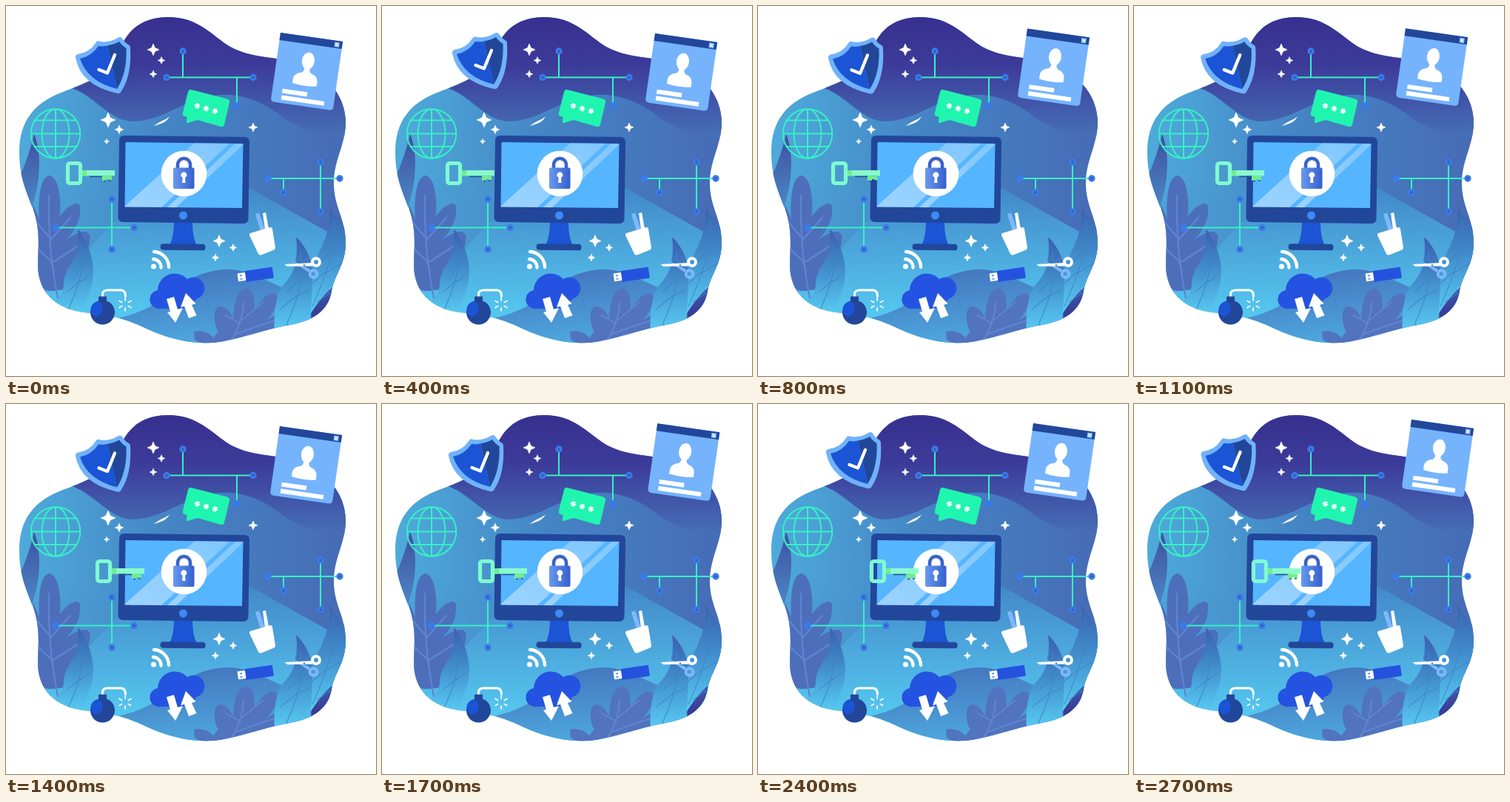
An HTML page that plays this animation: 500x500 px, repeating every 2.8 s.

```html
<!DOCTYPE html>
<html lang="en">
<head>
<meta charset="utf-8">
<title>Data security</title>
<style>
html, body { margin: 0; width: 100%; height: 100%; overflow: hidden; background: #fff; }
svg { display: block; width: 100vw; height: 100vh; }
.vein { fill: none; stroke: #6084d2; stroke-width: 2.2; stroke-linecap: round; }
.rib { fill: none; stroke: #3f83c4; stroke-width: 1.2; stroke-linecap: round; opacity: .8; }
.wire { fill: none; stroke: #37f0c5; stroke-width: 2; }
.line { fill: none; stroke: #fff; stroke-linecap: round; stroke-linejoin: round; }
</style>
</head>
<body>
<svg viewBox="0 0 500 500">
  <defs>
    <clipPath id="blob"><path d="M219 15C257 15 275 36 298 52C326 70 352 67 385 75C429 85 459 119 459 157C459 188 443 208 443 239C443 272 459 287 459 319C459 350 444 362 440 385C436 413 412 426 383 431C345 438 320 449 288 454C251 459 216 448 190 436C155 419 132 417 105 414C67 409 43 387 43 349C44 320 46 299 36 273C26 247 18 230 18 197C18 156 38 132 72 118C100 107 127 99 143 77C158 55 163 16 219 15Z"/></clipPath>
    <clipPath id="screen"><path d="M161.500 184L320.500 186L319 273L160.500 271.500Z"/></clipPath>
    <linearGradient id="mid"><stop offset="0" stop-color="#4faedd"/><stop offset=".45" stop-color="#4484c4"/><stop offset="1" stop-color="#4767b3"/></linearGradient>
    <linearGradient id="sky" x2="0" y2="1"><stop offset=".1" stop-color="#38308f"/><stop offset=".45" stop-color="#3c3b99"/><stop offset="1" stop-color="#4670b7"/></linearGradient>
    <linearGradient id="ground" x2="0" y2="1"><stop offset="0" stop-color="#4388c9"/><stop offset=".75" stop-color="#57cef3"/><stop offset="1" stop-color="#5fdbfb"/></linearGradient>
    <linearGradient id="left" x2="0" y2="1"><stop offset="0" stop-color="#448bc9" stop-opacity="0"/><stop offset="1" stop-color="#4f9dd8"/></linearGradient>
    <linearGradient id="hill" x2=".3" y2="1"><stop offset="0" stop-color="#446fbb"/><stop offset="1" stop-color="#4eaee1"/></linearGradient>
    <linearGradient id="leaf" x2="0" y2="1"><stop offset="0" stop-color="#3a5fae"/><stop offset=".4" stop-color="#3f86c8"/><stop offset="1" stop-color="#58cdf4"/></linearGradient>
    <linearGradient id="dusk" x2="0" y2="1"><stop offset="0" stop-color="#414f9f"/><stop offset="1" stop-color="#4b8fcd"/></linearGradient>
    <linearGradient id="corner" x2="0" y2="1"><stop offset="0" stop-color="#4488c8"/><stop offset="1" stop-color="#38298a"/></linearGradient>
    <linearGradient id="lock"><stop offset="0" stop-color="#6799ef"/><stop offset="1" stop-color="#365fce"/></linearGradient>
    <linearGradient id="shine" x1="1" y1="0" x2="0" y2="1"><stop offset="0" stop-color="#fff" stop-opacity=".24"/><stop offset="1" stop-color="#fff" stop-opacity=".42"/></linearGradient>
  </defs>

  <g clip-path="url(#blob)">
    <path fill="url(#mid)" d="M0 0H500V500H0Z"/>
    <path fill="url(#sky)" d="M80 0H480V177C430 178 397 168 370 147C345 128 313 116 281 121C240 127 213 154 174 156C138 157 121 118 80 108Z"/>
    <path fill="url(#ground)" d="M0 430L103 338L145 292L327 245L470 325V500H0Z"/>
    <path fill="url(#left)" d="M0 240H150V288L103 338L30 410Z"/>
    <path fill="url(#hill)" d="M140 424C180 417 200 405 226 385C252 363 286 351 318 358C348 364 366 383 400 386L450 400V470H140Z"/>
    <!-- left foliage -->
    <path fill="url(#dusk)" d="M38 173C47 193 46 225 42 245C38 263 34 276 30 288L14 240C23 222 31 202 38 173Z"/>
    <path fill="#4d6fbb" d="M59 229C70 232 75 254 73 284C83 269 98 262 100 271C102 287 94 304 81 316C93 308 108 300 113 309C116 328 101 346 84 354C102 350 109 357 103 368C93 381 73 386 58 385L40 380V296L36 268C42 280 44 285 45 290C43 257 47 230 59 229Z"/>
    <path class="vein" d="M58 256C57 310 61 350 71 400M59 317L87 286M61 348L96 325M58 312L43 294M61 345L42 327"/>
    <path fill="url(#leaf)" d="M97 301C108 315 118 337 118 359C118 382 108 397 101 418L62 408C70 392 77 393 78 375C78 360 88 350 94 337C98 326 98 315 97 301Z"/>
    <path class="rib" d="M102 323C108 357 95 386 83 413M104 352L92 367M101 371L84 385M105 352L114 342M101 372L114 363"/>
    <!-- lower leaves -->
    <g fill="#5273bd">
      <path d="M322 382C332 379 337 393 336 411C344 397 357 383 365 390C370 401 362 414 352 425C365 416 386 409 390 417C393 429 377 438 355 445L300 466H277C278 452 282 444 287 440C280 430 279 407 289 406C298 406 303 414 307 422C308 403 311 387 322 382Z"/>
      <path d="M254 440C267 437 279 443 285 455L277 463L255 451Z"/>
    </g>
    <path class="vein" d="M321 401C320 425 309 444 301 459M316 429L297 418M319 424L347 401M311 443L365 424"/>
    <!-- right foliage -->
    <path fill="url(#corner)" d="M430 315H470V440H403Z"/>
    <path fill="url(#leaf)" d="M438 268C440 288 456 290 462 307V365C445 377 433 383 411 417C407 397 407 377 412 359C416 342 430 325 434 304C437 292 438 282 438 268Z"/>
    <path class="rib" d="M443 288C447 327 430 370 414 406M439 332L420 352M440 333L458 319M432 359L415 374M433 360L455 347"/>
    <path fill="url(#leaf)" d="M392 312C406 326 414 342 414 363C414 393 411 410 413 432L363 440C362 423 363 405 367 393C371 374 386 372 390 350C393 336 394 328 392 312Z"/>
    <path class="rib" d="M398 334C404 370 391 405 378 433M400 367L380 386M401 369L412 358M394 391L371 409M394 392L411 383"/>
    <path class="rib" stroke="#57cdf3" d="M420 400L438 388M432 387L443 389"/>
  </g>

  <g class="wire">
    <circle cx="67" cy="172.500" r="33.300"/><ellipse cx="67" cy="172.500" rx="18.500" ry="33.300"/>
    <path d="M67 139V206M33.500 172.500H100.500M39 154.500H95M39 190H95"/>
    <path d="M239 61V96.500M217 96.500H334M312 96.500V135M354 233H451M425 211V278M375 233V252M67 299.500H173M143 261V329"/>
  </g>
  <g id="nodes"></g>
  <g id="stars" fill="#fff"></g>
  <path fill="#fff" d="M199 162C210 160 218 156 221 149C218 153 207 156 203 160Z"/>

  <!-- chat bubble -->
  <path fill="#20f5b0" d="M250 113L299 125.500Q303 127 302 130.500L295 160Q294 164 290 163L259 154L244 158.500L244.500 150L241 149Q238 147.500 239 144L246 116Q247 112.500 250 113Z"/>
  <path id="dots" class="line" stroke-width="2.100"/>

  <!-- monitor -->
  <path fill="#1b54d5" d="M227 291H252Q252 314 258 323H221Q227 312 227 291Z"/>
  <rect x="208.500" y="321.500" width="61" height="8.500" rx="4" fill="#22479a" transform="rotate(.8 239 326)"/>
  <path fill="#22479a" d="M160 175L322 177Q329 177 329 184L327.500 287Q327.500 294 320 294L158 292Q151.500 292 151.500 285L153 182Q153 175 160 175Z"/>
  <path fill="#56b5ff" d="M161.500 184L320.500 186L319 273L160.500 271.500Z"/>
  <g clip-path="url(#screen)" fill="url(#shine)">
    <path d="M256 184H304L208 274H160V271Z"/><path d="M312 184H324L228 274H216Z"/>
  </g>
  <circle cx="239.500" cy="283" r="5.500" fill="#3d8af8"/>
  <circle cx="240.500" cy="226.500" r="30.800" fill="#fff"/>
  <path d="M232 220V214.500A8.500 8.500 0 0 1 249 214.500V220" fill="none" stroke="#3764c6" stroke-width="4.500"/>
  <rect x="226" y="218.500" width="28.500" height="28.500" rx="2" fill="url(#lock)"/>
  <path fill="#fff" d="M238.700 232A4 4 0 1 1 242 232L242.500 239H238Z"/>

  <!-- wifi -->
  <circle cx="199.500" cy="352" r="3.600" fill="#fff"/>
  <path class="line" stroke-width="4.300" d="M199 342A11 11 0 0 1 209.500 353.500M200 332A21 21 0 0 1 220 353"/>

  <!-- cup -->
  <path fill="#80b7fb" d="M337 281L342 279.500L350 303L344 305Z"/>
  <path fill="#fff" d="M347 280L351 279L355 301L350 302Z"/>
  <path fill="#fff" d="M330 307L357 299Q360 299 360 302L364 326Q364 329 361 330L345 336.500Q342 337 341 335L329.500 311Q328 308 330 307Z"/>

  <!-- flash drive -->
  <g transform="rotate(-8 337 363)">
    <rect x="323" y="356" width="38" height="15" rx="1" fill="#2452df"/>
    <rect x="313" y="358" width="10.500" height="11" fill="#fff"/>
    <path fill="#619cf0" d="M316 360.500h3v2h-3zM316 365h3v2h-3z"/>
  </g>

  <!-- scissors -->
  <g fill="none" stroke-width="4">
    <path fill="#80b7fb" d="M385 343L411 356L409 360Z"/><circle cx="415.500" cy="362" r="4.800" stroke="#80b7fb"/>
    <path fill="#fff" d="M376.500 349L414 347V351.500L380 352Z"/><circle cx="419" cy="346" r="5" stroke="#fff"/>
  </g>
  <circle cx="403" cy="350.500" r="1.200" fill="#4b75bd"/>

  <!-- cloud -->
  <path fill="#2553e1" d="M209 409A12.500 12.500 0 0 1 205 384A23 23 0 0 1 245 369A15 15 0 1 1 257 396Q251 409 235 409Z"/>
  <g id="arrow" fill="#fff">
    <path d="M217 396L227 393L232 410L239 408L229 428L218 414L222 413Z"/>
    <path d="M243 388L256.500 402L251 404L257.500 418L247 422L241 406L236 407Z"/>
  </g>

  <!-- bomb -->
  <path class="line" stroke-width="3" d="M130.500 394V390Q130.500 384 137 384H155Q161.500 384 161.500 392"/>
  <rect x="125" y="392.500" width="11" height="9" fill="#22479a"/>
  <circle cx="130.500" cy="414" r="16.500" fill="#22479a"/>
  <ellipse cx="122.500" cy="409.500" rx="8" ry="10" fill="#1b54d5" transform="rotate(15 122.500 409.500)"/>
  <path id="spark" class="line" stroke-width="1.700"/>

  <g id="shield">
    <path fill="#70b2fc" d="M94 70Q93 67 97 65Q113 63 121 50Q123 46 127 48Q140 50 152 42.500Q156 41 158 45Q161 50 165 52Q168 53 168 57Q170 93 156 115Q154 119 150 118Q101 107 94 70Z"/>
    <path fill="#1b54d5" d="M100 71Q116 68 125 54Q131 55 137 53.500L150 112Q110 102 100 71Z"/>
    <path fill="#22479a" d="M137 53.500Q147 51.500 153 48Q157 54 162.500 57Q164 90 150 112Z"/>
    <path class="line" stroke-width="4.300" d="M125.500 86L137 90.500L147 66"/>
  </g>

  <g id="card">
    <g transform="translate(371 36) rotate(8.200)">
      <path fill="#75b3fd" d="M0 0H85V89Q85 94 80 94H5Q0 94 0 89Z"/>
      <path fill="#22479a" d="M0 0H85V10H0Z"/>
      <rect x="74.500" y="2" width="6.500" height="6.500" fill="#90c4ff"/>
      <path d="M76 3.500l3.500 3.500m0-3.500l-3.500 3.500" stroke="#fff"/>
      <g fill="#fff">
        <ellipse cx="42.500" cy="32.500" rx="8.500" ry="11.500"/>
        <path d="M25.500 65V59Q26 51 36 49Q39 47 39 42H46Q46 47 49 49Q58 51 58.500 59V65Q42 68 25.500 65Z"/>
        <path d="M13.500 74.500h34v6h-34zM13.500 83.500h58.500v6h-58.500z"/>
      </g>
    </g>
  </g>

  <g id="key">
    <path fill="#88fbcb" d="M102 222H147V229.500H102Z"/>
    <path fill="#72ec90" d="M102 222H109V229.500H102ZM130 229.500H143V235.500H139V234H136V236H130Z"/>
    <path d="M113 230.500H130M132 236.500h3M139 236h3" stroke="#22538c" stroke-width="1.500"/>
    <rect x="83.500" y="212.500" width="17" height="27" rx="3" fill="none" stroke="#7ffbd0" stroke-width="5.200"/>
  </g>
</svg>
<script>
const $ = id => document.getElementById(id);

const nodes = [[239, 61], [217, 96.5], [334, 96.5], [312, 135], [354, 233], [451, 233], [425, 211],
  [425, 278], [375, 252], [67, 299.5], [173, 299.5], [143, 261], [143, 329]];
const solid = new Set([3, 4, 9]);
$('nodes').innerHTML = nodes.map(([x, y], i) =>
  `<circle cx="${x}" cy="${y}" r="3.2" stroke="#397bec" stroke-width="3" fill="${solid.has(i) ? '#397bec' : '#3a58ac'}"/>`).join('');

const stars = [[199, 59, 8], [210, 73.5, 4.8], [199, 92, 4.8], [138, 154, 10], [153, 167, 5.8],
  [136, 183, 3.6], [334, 164, 6], [317, 180.5, 3.6], [288, 317.5, 8], [307, 326.5, 4.8], [283, 340, 4.8]];
const star = ([x, y, r]) => {
  const k = r * .3;
  return `M${x} ${y - r}L${x + k} ${y - k}L${x + r} ${y}L${x + k} ${y + k}L${x} ${y + r}L${x - k} ${y + k}L${x - r} ${y}L${x - k} ${y - k}Z`;
};
$('stars').innerHTML = `<path stroke="#fff" stroke-width=".6" stroke-linejoin="round" d="${stars.map(star).join('')}"/>`;

// Spokes around a centre, from radius a to radius b
const rays = (x, y, a, b, n, turn) => Array.from({ length: n }, (_, i) => {
  const q = turn + i * 2 * Math.PI / n, c = Math.cos(q), s = Math.sin(q);
  return `M${x + a * c} ${y + a * s}L${x + b * c} ${y + b * s}`;
}).join('');
$('dots').setAttribute('d', [[258.5, 135], [270.5, 138.5], [282.5, 142]].map(([x, y]) => rays(x, y, 0, 3, 6, .3)).join(''));
$('spark').setAttribute('d', rays(161, 403, 5, 9, 6, Math.PI / 6) + 'M161 396V394');

// Each row: time in ms, x, y
const tracks = {
  key: [[0, 0, 0], [200, 1.5, 0], [400, 5, 0], [600, 11, 0], [800, 18, 0], [1400, 40, 0], [2000, 58, 0], [2400, 70, 0], [2800, 80.5, 0]],
  shield: [[0, 0, 0], [400, 1, -6], [800, 1, .5], [1000, -5, 0], [1400, 0, .5], [1700, -4, 0], [2000, 7, .5], [2400, -2, -4], [2800, -4, 0]],
  card: [[0, 0, 0], [400, -2, 1], [800, -7, -5.5], [1400, -1, -6], [1800, 2, -11], [2000, -1, -11], [2200, 1, -13], [2400, 1, -10], [2700, 4, -15], [2800, 4, -15]]
};
const LOOP = 2800, STEP = 100;

function at(rows, t) {
  const i = rows.findIndex(r => r[0] > t);
  const a = rows[i - 1], b = rows[i], p = (t - a[0]) / (b[0] - a[0]);
  return [1, 2].map(j => a[j] + (b[j] - a[j]) * p);
}

const start = performance.now();
function draw(now) {
  const t = Math.floor(Math.max(0, now - start) % LOOP / STEP) * STEP;
  for (const id in tracks) $(id).setAttribute('transform', `translate(${at(tracks[id], t)})`);
  requestAnimationFrame(draw);
}
draw(start);
</script>
</body>
</html>
```
